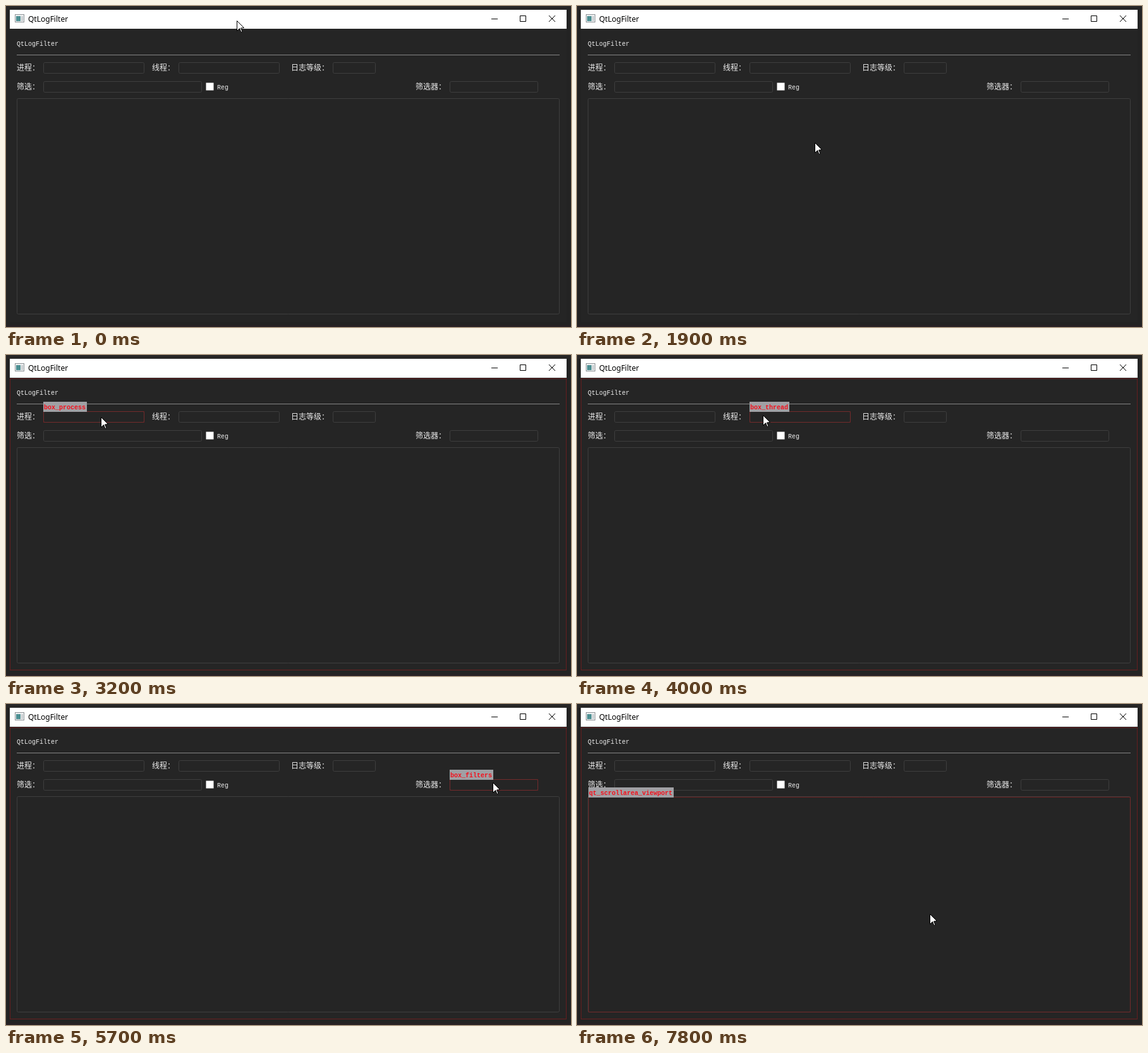
These frames come from a looping animation (894 px wide and 508 px high, 8 s). An HTML page with a canvas:

```html
<!DOCTYPE html>
<html lang="zh-CN">
<head>
<meta charset="utf-8">
<title>QtLogFilter</title>
<style>
  html, body { margin: 0; width: 100%; height: 100%; overflow: hidden; background: #232323; }
  canvas { display: block; }
</style>
</head>
<body>
<canvas id="stage" width="894" height="508"></canvas>
<script>
const ctx = document.getElementById('stage').getContext('2d');
const LOOP = 8000, STEP = 100, INSPECT_FROM = 2000;
const LIGHT = '#ececec';
const MONO = '10px "Liberation Mono", monospace';
const CJK = '12px "Noto Sans CJK SC", sans-serif';
const UI = '12px "Noto Sans", sans-serif';

// Labelled input boxes; each name is shown while the pointer is over its box.
const GAP = 6, CHAR = 12, ROW = [89, 119], BOX_H = 18;
const field = (name, label, row, x, w, edit = false) =>
  ({ name, label, x, y: ROW[row], w, h: BOX_H, edit });
const fields = [
  field('box_process', '进程：', 0, 59, 160),
  field('box_thread', '线程：', 0, 273, 160),
  field('box_level', '日志等级：', 0, 517, 68),
  field('filter_str', '筛选：', 1, 59, 251, true),
  field('box_filters', '筛选器：', 1, 702, 140),
];
const logArea = { x: 17, y: 146, w: 859, h: 342 };
const viewport = { name: 'qt_scrollarea_viewport', x: 18, y: 147, w: 858, h: 341 };
const targets = [...fields, viewport];

// Pointer moves; it rests between them.
const home = { x: 365, y: 23 };
const moves = [
  { from: 0, to: 600, x: 356, y: 219 },
  { from: 1800, to: 1900, x: 376, y: 216 },
  { from: 1900, to: 2400, x: 276, y: 121 },
  { from: 2400, to: 3200, x: 150, y: 98 },
  { from: 3700, to: 4000, x: 294, y: 95 },
  { from: 4000, to: 4700, x: 547, y: 89 },
  { from: 4800, to: 5000, x: 659, y: 69 },
  { from: 5000, to: 5700, x: 770, y: 124 },
  { from: 6200, to: 6300, x: 784, y: 131 },
  { from: 7200, to: 7800, x: 558, y: 332 },
];

const smooth = k => k * k * (3 - 2 * k);
const mix = (a, b, k) => Math.round(a + (b - a) * k);

function pointerAt(t) {
  return moves.reduce((p, m) => {
    const k = smooth(Math.min(1, Math.max(0, (t - m.from) / (m.to - m.from))));
    return { x: mix(p.x, m.x, k), y: mix(p.y, m.y, k) };
  }, home);
}

function fill(x, y, w, h, color) {
  ctx.fillStyle = color;
  ctx.fillRect(x, y, w, h);
}

function text(str, x, y, font, color) {
  ctx.font = font;
  ctx.fillStyle = color;
  ctx.fillText(str, x, y);
}

function outline({ x, y, w, h }, color, { radius = 0, dash = [] } = {}) {
  ctx.setLineDash(dash);
  ctx.strokeStyle = color;
  ctx.beginPath();
  ctx.roundRect(x + .5, y + .5, w - 1, h - 1, radius);
  ctx.stroke();
  ctx.setLineDash([]);
}

function drawTitleBar() {
  fill(6, 6, 881, 30, '#fff');
  fill(14, 13, 15, 13, '#8d9296');
  fill(15, 14, 13, 11, '#f1f3f4');
  fill(16, 16, 7, 8, '#4d8f92');
  fill(24, 16, 3, 8, '#c9ced1');
  text('QtLogFilter', 35, 25, UI, '#000');

  fill(768, 20, 10, 1, '#000');
  outline({ x: 813, y: 15, w: 10, h: 10 }, '#000');
  ctx.beginPath();
  for (const side of [-1, 1]) {
    ctx.moveTo(864 - 5 * side, 15);
    ctx.lineTo(864 + 5 * side, 25);
  }
  ctx.stroke();
}

function drawWindow() {
  fill(0, 0, 894, 508, '#232323');
  fill(0, 0, 894, 6, '#272626');
  fill(0, 505, 894, 3, '#282124');
  fill(6, 36, 881, 464, '#252525');
  drawTitleBar();

  text('QtLogFilter', 17, 63, MONO, LIGHT);
  fill(17, 77, 859, 1, '#858585');
  for (const f of fields) {
    text(f.label, f.x - GAP - f.label.length * CHAR, f.y + 13, CJK, LIGHT);
    outline(f, '#3e3e3e', { radius: 2 });
  }
  fill(316.5, 121.5, 12, 12, '#fff');
  text('Reg', 334, 132, MONO, LIGHT);
  outline(logArea, '#3e3e3e', { radius: 2 });
}

function drawInspector(hit) {
  const dotted = r => outline(r, '#a8181a', { dash: [1, 1] });
  dotted({ x: 6, y: 37, w: 881, h: 462 });
  if (!hit) return;
  dotted(hit);
  fill(hit.x, hit.y - 15, hit.name.length * 6 + 3, 16, '#a0a0a4');
  text(hit.name, hit.x + 1, hit.y - 3, 'bold ' + MONO, '#f5101c');
}

function drawArrow({ x, y }) {
  const shape = [[0, 0], [0, 16], [4, 12], [6.5, 18], [8.5, 17], [6, 11.5], [11, 11]];
  ctx.beginPath();
  shape.forEach(([dx, dy]) => ctx.lineTo(x + dx + .5, y + dy + .5));
  ctx.closePath();
  ctx.fillStyle = '#fff';
  ctx.fill();
  ctx.strokeStyle = '#000';
  ctx.stroke();
}

function drawBeam({ x, y }) {
  const color = '#d8d8d8';
  fill(x, y - 6, 1, 13, color);
  for (const edge of [y - 7, y + 7]) {
    fill(x - 3, edge, 3, 1, color);
    fill(x + 1, edge, 3, 1, color);
  }
}

function draw(t) {
  const p = pointerAt(t);
  const hit = targets.find(r => p.x >= r.x && p.x < r.x + r.w && p.y >= r.y && p.y < r.y + r.h);
  drawWindow();
  if (t >= INSPECT_FROM) drawInspector(hit);
  (hit && hit.edit ? drawBeam : drawArrow)(p);
}

const start = performance.now();
function tick() {
  const t = (performance.now() - start) % LOOP;
  draw(Math.floor(t / STEP) * STEP);
  requestAnimationFrame(tick);
}
tick();
</script>
</body>
</html>
```
